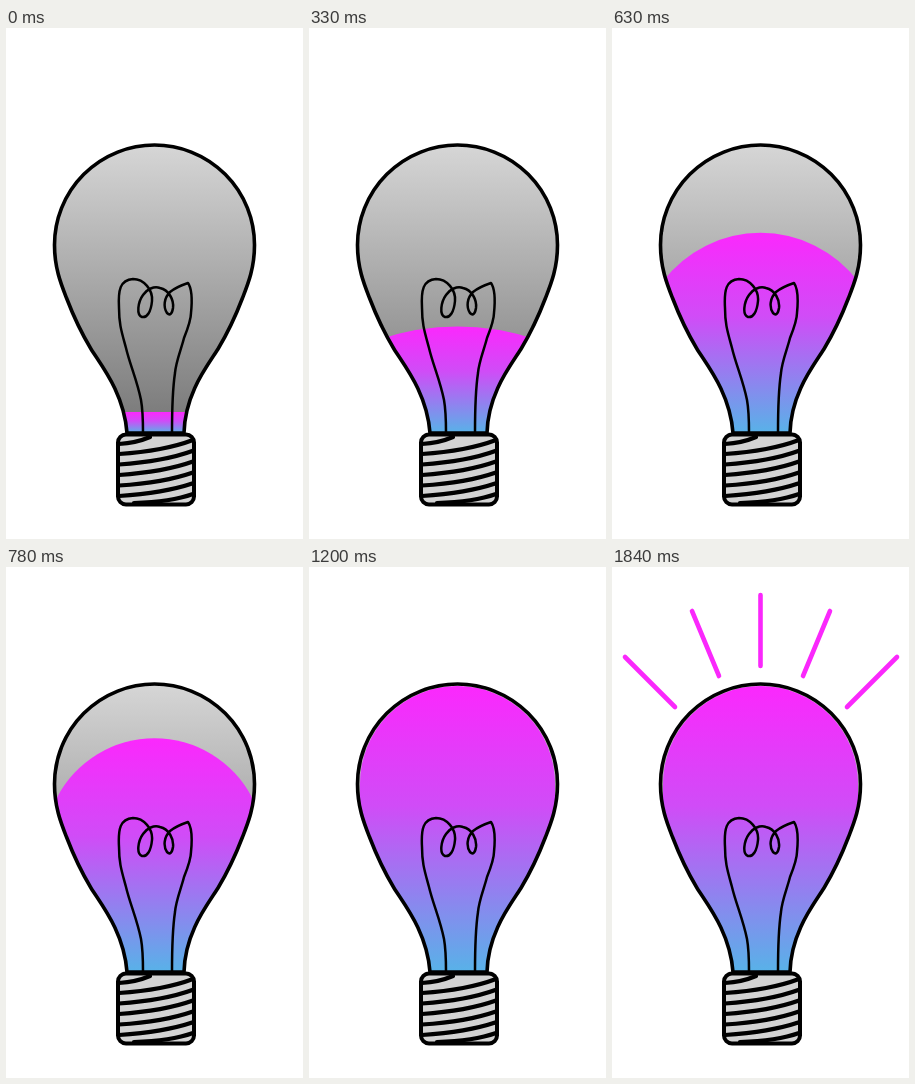
These frames come from a looping animation (297x511 px, 2170 ms). An HTML page:

```html
<!DOCTYPE html>
<html lang="en">
<head>
<meta charset="utf-8">
<title>Light bulb</title>
<style>
  html, body { margin: 0; width: 100%; height: 100%; overflow: hidden; background: #fff; }
  svg { display: block; width: 100vw; height: 100vh; }
</style>
</head>
<body>
<svg viewBox="0 0 297 511" fill="none" stroke-linecap="round" stroke-linejoin="round">
  <defs>
    <path id="glass" d="M121 405C118 365 95 337 85 321C76 306 67 287 60.5 270C55 256 48.5 240 48.5 217A100 100 0 0 1 248.5 217C248.5 240 242 256 236.5 270C230 287 221 306 212 321C202 337 179 365 178 405Z"/>
    <clipPath id="inside"><use href="#glass"/></clipPath>
    <linearGradient id="gray" gradientUnits="userSpaceOnUse" x1="0" y1="117" x2="0" y2="405">
      <stop stop-color="#d6d6d6"/>
      <stop offset="1" stop-color="#767676"/>
    </linearGradient>
    <linearGradient id="neon" gradientUnits="userSpaceOnUse" x1="0" y1="384" x2="0" y2="405">
      <stop stop-color="#fb28fd"/>
      <stop offset=".42" stop-color="#d04cf7"/>
      <stop offset="1" stop-color="#58b2e8"/>
    </linearGradient>
  </defs>
  <use href="#glass" fill="url(#gray)"/>
  <g clip-path="url(#inside)"><path id="liquid" fill="url(#neon)"/></g>
  <g stroke="#000">
    <use href="#glass" stroke-width="3.6"/>
    <path stroke-width="2.5" d="M137 405C137 390 137 383 135 372C131 352 124 337 120 320C116 305 113 297 113 280C112 262 114 252 127 251C138 251 147 262 146 273C145 284 141 290 136 289C130 287 132 274 137 267C141 261 148 258 154 260C163 262 168 272 167 280C166 286 164 288 161 285C157 279 158 270 164 264C169 260 176 257 182 255C187 262 186 275 185 285C185 292 182 300 178 310C175 322 170 333 169 345C166 365 166 385 166 405"/>
    <rect x="112" y="406.500" width="76" height="70" rx="8" fill="#d3d3d3" stroke-width="4"/>
    <path id="threads" stroke-width="4.2"/>
  </g>
  <path id="rays" stroke="#fa28fc" stroke-width="4.6" d="M148.500 28V99M80 44L107 109M218 44L191 109M13 90L63 140M285 90L235 140"/>
</svg>
<script>
const LOOP = 2170, STEP = 30, FILL_END = 1200, RAYS_START = 1570;
const CENTER = 148.5, HALF = 97.5, BOTTOM = 406;
const $ = id => document.getElementById(id);
const mix = (a, b, p) => a + (b - a) * p;
const easeIn = u => mix(u * u, u, 0.75);
const easeOut = u => mix(2 * u - u * u, u, 0.46);

// Each stage moves the top of the liquid and bends its surface.
const stages = [
  { from: 0, to: 540, top: [384, 229], bend: [0.00001, 1 / 133], ease: easeIn },
  { from: 540, to: 1080, top: [229, 129], bend: [1 / 133, 1 / HALF], ease: easeOut },
  { from: 1080, to: FILL_END, top: [129, 119], bend: [1 / HALF, 1 / HALF], ease: u => u }
];

let threads = 'M113 416Q130 415 144 409M128 475Q165 474 187 466';
for (let i = 0; i < 5; i++) {
  const left = 426 + 10.5 * i, right = 412 + 10.8 * i;
  threads += `M113 ${left}Q158 ${left - 3} 187 ${right}`;
}
$('threads').setAttribute('d', threads);

function render(time) {
  const t = Math.min(Math.floor(time / STEP) * STEP, FILL_END);
  const stage = stages.find(s => t <= s.to);
  const p = stage.ease((t - stage.from) / (stage.to - stage.from));
  const top = mix(...stage.top, p);
  const radius = Math.max(HALF, 1 / mix(...stage.bend, p));
  const shoulder = top + radius - Math.sqrt(radius * radius - HALF * HALF);

  $('liquid').setAttribute('d',
    `M${CENTER - HALF} ${shoulder}A${radius} ${radius} 0 0 1 ${CENTER + HALF} ${shoulder}V${BOTTOM}H${CENTER - HALF}Z`);
  $('neon').setAttribute('y1', top);

  const fade = Math.floor((time - RAYS_START) / STEP) + 1;
  $('rays').setAttribute('opacity', Math.max(0, Math.min(1, fade / 10)));
}

const start = performance.now();
function tick() {
  render((performance.now() - start) % LOOP);
  requestAnimationFrame(tick);
}
tick();
</script>
</body>
</html>
```
